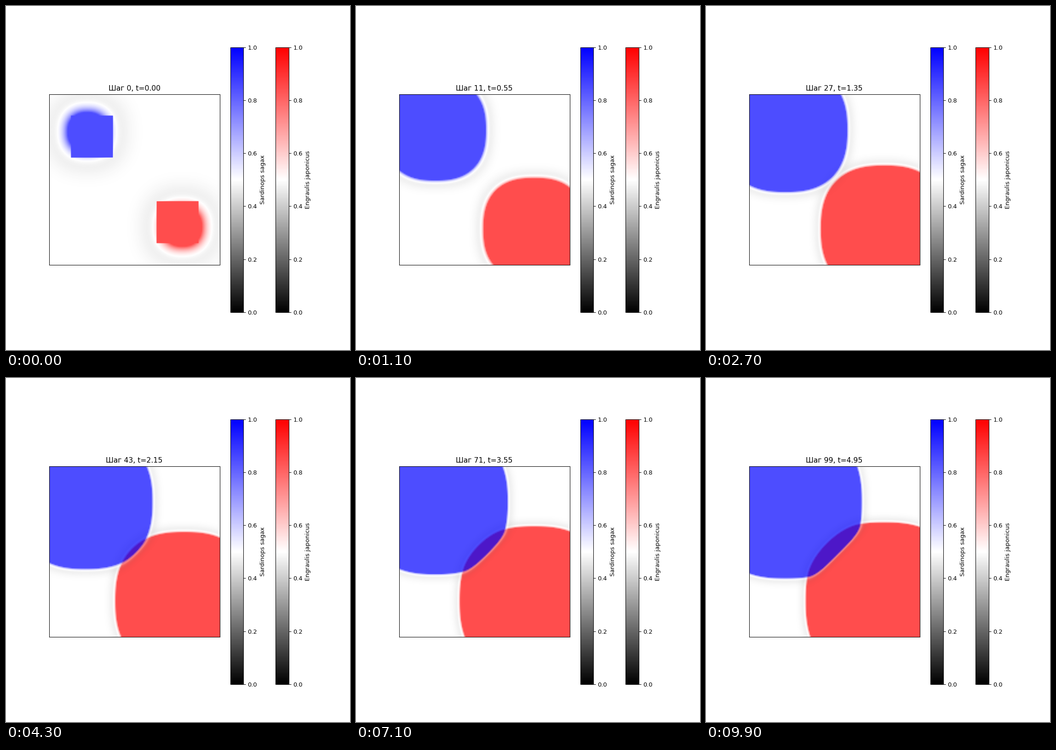
These frames come from a looping animation (748 px wide and 748 px high, 10000 ms). A matplotlib script:

```python
import numpy as np
import matplotlib.pyplot as plt
from matplotlib.animation import FuncAnimation
from matplotlib.cm import ScalarMappable
from matplotlib.colors import LinearSegmentedColormap

N = 150          # grid cells per side
STEPS = 100
DT = 0.05
SIDE = 371.0     # side of the map in pixels
ALPHA = 0.7

axis = (np.arange(N) + 0.5) / N * SIDE
X, Y = np.meshgrid(axis, axis)

# Front radius of each species at a few steps, interpolated in between
KNOTS = np.array([0, 11, 27, 43, 59, 84, 99])
SARDINE = np.array([42, 108.5, 133.3, 144.1, 151.3, 159.4, 164.5])
ANCHOVY = np.array([42, 109.0, 135.9, 147.9, 155.6, 164.2, 168.8])


def square(lo, hi):
    mask = np.zeros((N, N), bool)
    mask[lo:hi, lo:hi] = True
    return mask


SARDINE_HOME = square(19, 56)
ANCHOVY_HOME = square(94, 131)


def settle(step, start, end):
    """Value that drifts from start to end while the fronts take shape."""
    return np.interp(step, [0, 11], [start, end])


def level(step, radii, mirrored):
    """Log density, zero on the edge of the saturated area."""
    r2 = np.interp(np.log(step + 3), np.log(KNOTS + 3), radii ** 2)
    c = settle(step, 0.222, 0.211) * SIDE
    p = settle(step, 2.3, 2.5)
    if mirrored:
        c = SIDE - c
    rho = (np.abs(X - c) ** p + np.abs(Y - c) ** p) ** (1 / p)
    return (r2 - rho ** 2) / settle(step, 3400, 2300)


def density(own, rival, pressure, home):
    u = np.exp(np.minimum(0, own - pressure * np.maximum(0, rival) ** 2))
    u[home] = 1
    return u


def fields(step):
    a = level(step, SARDINE, False)
    b = level(step, ANCHOVY, True)
    return (density(a, b, 0.1, SARDINE_HOME),
            density(b, a, 0.027, ANCHOVY_HOME))


fig, ax = plt.subplots(figsize=(8, 8), dpi=93.5)
ax.set_xticks([])
ax.set_yticks([])


def layer(color, label):
    cmap = LinearSegmentedColormap.from_list(label, ["black", "white", color])
    im = ax.imshow(np.zeros((N, N)), cmap=cmap, vmin=0, vmax=1)
    fig.colorbar(ScalarMappable(im.norm, cmap), ax=ax, label=label)
    return im


anchovy = layer("red", "Engraulis japonicus")
sardine = layer("blue", "Sardinops sagax")
title = ax.set_title("")


def update(step):
    for im, u in zip((sardine, anchovy), fields(step)):
        im.set_data(u)
        im.set_alpha(ALPHA * u ** 1.4)
    title.set_text(f"Шаг {step}, t={step * DT:.2f}")
    return sardine, anchovy, title


anim = FuncAnimation(fig, update, frames=STEPS, interval=100,
                     repeat=True, repeat_delay=0, blit=False)
plt.show()
```
